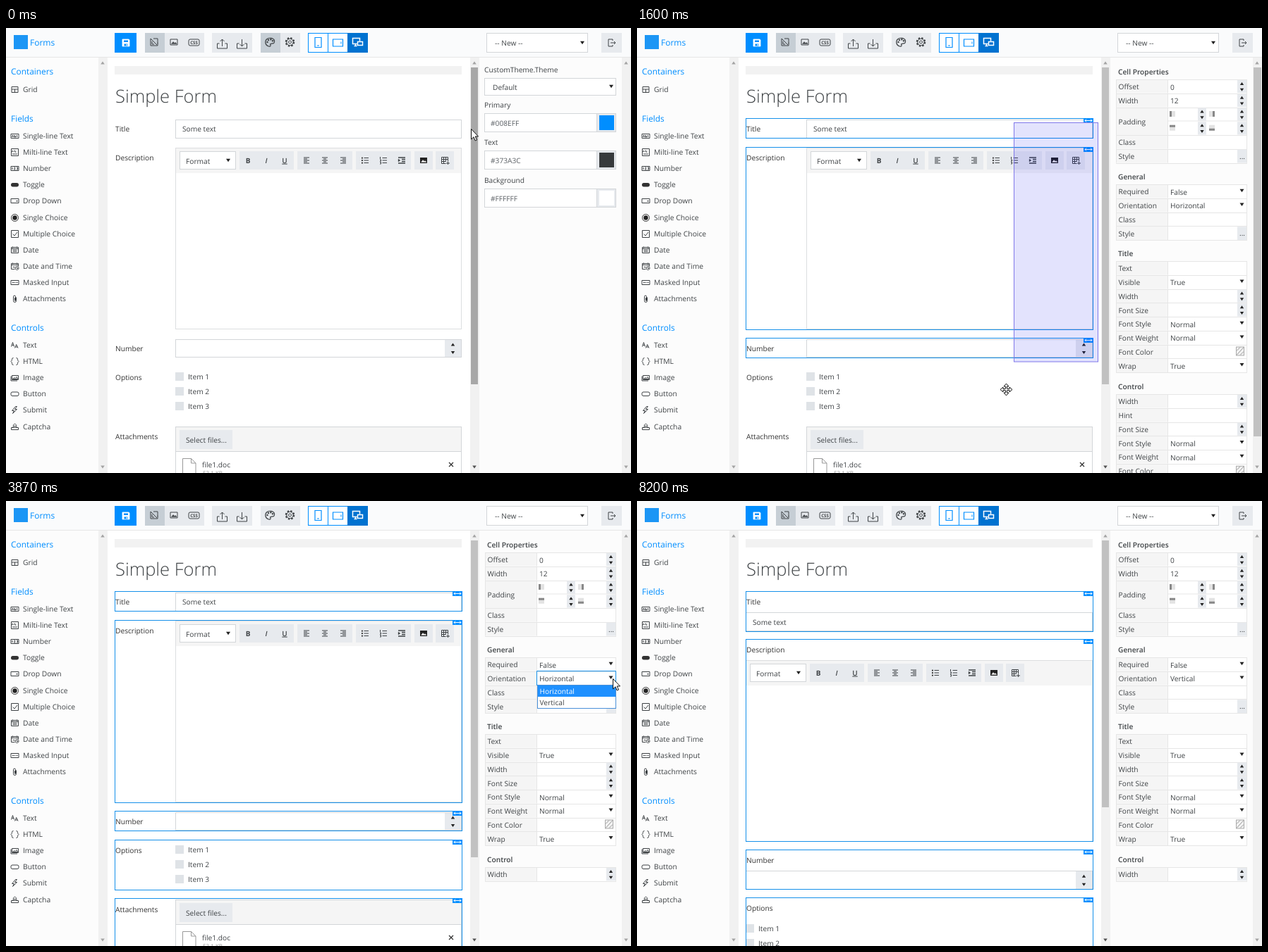
These frames come from a looping animation (886x632 px, 8.34 s). An HTML page:

```html
<!DOCTYPE html>
<html lang="en">
<head>
<meta charset="utf-8">
<title>Form designer</title>
<style>
html, body { margin: 0; width: 100%; height: 100%; overflow: hidden; background: #fff; }
svg { display: block; width: 886px; height: 632px; font: 10.2px "Open Sans", "Noto Sans", sans-serif; text-rendering: geometricPrecision; }
</style>
</head>
<body>
<svg id="stage" viewBox="0 0 886 632" xmlns="http://www.w3.org/2000/svg"></svg>
<script>
const BLUE = '#008eff', INK = '#3f4346', GREY = '#e7eaee', LINE = '#d3d6d9', SOFT = '#e6e6e6';

// ---- drawing helpers, all return markup ----
const rect = (x, y, w, h, fill, extra = '') =>
  `<rect x="${x}" y="${y}" width="${w}" height="${h}" fill="${fill}" ${extra}/>`;
const box = (x, y, w, h, fill, stroke) =>
  rect(x + .5, y + .5, w - 1, h - 1, fill, `stroke="${stroke}"`);
const text = (x, y, s, extra = '') => `<text x="${x}" y="${y}" fill="${INK}" ${extra}>${s}</text>`;
const path = (d, stroke = INK, fill = 'none', w = 1) =>
  `<path d="${d}" fill="${fill}" stroke="${stroke}" stroke-width="${w}"/>`;
const icon = (x, y, body) =>
  `<g transform="translate(${x} ${y})">${body[0] === '<' ? body : path(body)}</g>`;
const tri = (x, y, dir = 1, r = 3, fill = '#222') =>
  `<path d="M${x - r} ${y - dir * r * .75}h${2 * r}l${-r} ${dir * r * 1.5}z" fill="${fill}"/>`;
const spinner = (x, y, h, w = 13) =>
  rect(x, y, w, h, GREY) + tri(x + w / 2, y + h * .27, -1, 2.7) + tri(x + w / 2, y + h * .75, 1, 2.7);
const group = (id, body) => `<g id="${id}">${body}</g>`;

// ---- top bar ----
const IMAGE = path('M-5-4h10v8h-10z') + path('M-3.5 2.5l2.5-3 2 2 1.5-1 1.5 2z', INK, INK, .5);
const TRAY = 'M-4-1h-3v7h14v-7h-3';
function topBar() {
  const gear = '<circle r="5.6" fill="none" stroke="#3f4346" stroke-width="2.4" stroke-dasharray="2.4 2"/>' +
    '<circle r="4.7" fill="none" stroke="#3f4346"/><circle r="2" fill="none" stroke="#3f4346"/>';
  const palette = path('M6-2C5-6-2-7-5-4S-7 5-2 6c3 1 3-2 2-3 1-2 7 1 6-5z', INK, 'none', 1.2) +
    [[-4, 0], [-2.5, -3], [.8, -3.8], [3.6, -1.8]].map(([x, y]) => `<circle cx="${x}" cy="${y}" r="1.2" fill="${INK}"/>`).join('');
  return rect(0, 0, 886, 41, '#fafbfc') + rect(0, 41, 886, 1, SOFT) +
    rect(11, 10, 20, 20, '#1c96f5') + text(34, 25, 'Forms', `style="font-size:12px;fill:${BLUE}"`) +
    rect(154, 7, 31, 28, BLUE) +
    icon(170, 21, path('M-5-5h9l1 1v9h-10z', '#fff', '#fff', .8) + rect(-3, -3.5, 6, 2.5, BLUE) + rect(-2.5, 1.5, 5, 3, BLUE) + rect(.5, 2, 1.2, 2, '#fff')) +
    rect(197, 7, 84, 28, GREY) + rect(197, 7, 28, 28, '#c6ced5') +
    icon(210, 20, 'M-5-5v10h10v-4M-5-5l9 9M-1-5h6v7M-3-1v4h3') +
    icon(238, 20, IMAGE) +
    icon(266.5, 20.5, '<rect x="-7.5" y="-4.5" width="15" height="9" rx="2" fill="none" stroke="#3f4346"/>' +
      text(0, 2.4, 'CSS', 'text-anchor="middle" style="font-size:6.2px;font-weight:700"')) +
    rect(292, 7, 57, 28, GREY) +
    icon(306.5, 23, TRAY + 'M0 3v-10M-3-4l3-3 3 3') + icon(334.5, 23, TRAY + 'M0-7v10M-3 0l3 3 3-3') +
    rect(361, 7, 56, 28, GREY) + group('theme-on', rect(361, 7, 28, 28, '#c6ced5')) +
    icon(374.5, 20, palette) + icon(402.5, 20, gear) +
    box(428, 7, 29, 28, '#fff', BLUE) + box(456, 7, 30, 28, '#fff', BLUE) + rect(484, 7, 29, 28, '#0072d0') +
    icon(442.5, 20.5, path('M-4.5-7h9v14h-9z', BLUE, 'none', 1.2) + rect(-1.5, 4, 3, 1, BLUE)) +
    icon(470.5, 21, path('M-7-5h14v10h-14z', BLUE, 'none', 1.2) + rect(4, -1.5, 1, 3, BLUE)) +
    icon(498.5, 20.5, path('M-1 2h-6v-8h10v4M-5 5h4M-3 2v3M0-1h7v5H0z', '#fff', 'none', 1.5)) +
    box(681, 7, 144, 28, '#fff', LINE) + text(693, 25, '-- New --') + tri(817, 21) +
    rect(844, 7, 29, 28, GREY) + icon(859, 21, 'M1-3v-2h-6v10h6v-2M-2 0h7M3-2l2 2-2 2');
}

// ---- toolbox on the left ----
const FRAME = 'M-5.5-3h11v6h-11z';
const TOOLS = [
  ['Containers', 66, 91, [['Grid', 'M-4.5-4h9v8h-9zM-4.5-.5h9M0-.5v4.5']]],
  ['Fields', 133, 157, [
    ['Single-line Text', FRAME + 'M-4 1.5l1-3 1 3M-.5-1.5v3h1.5v-1.5h-1.5M3-1.5v3'],
    ['Milti-line Text', 'M-5-5h10v10h-10zM-4-.5l1-2 1 2M0-3v2.5h2M-3.5 2.5h7'],
    ['Number', FRAME + 'M-3.5-1.5v3M-1-1.5h1.5l-1.5 3h2M2.5-1.5h1.5v3h-1.5'],
    ['Toggle', '<rect x="-5.5" y="-2.5" width="11" height="5.5" rx="2.7" fill="#333"/>'],
    ['Drop Down', path(FRAME) + rect(2, -.5, 2, 1.5, INK)],
    ['Single Choice', '<circle r="5" fill="none" stroke="#333"/><circle r="3.2" fill="#222"/>'],
    ['Multiple Choice', 'M-5-5h10v10h-10zM-3 0l2.5 2.5 4-5'],
    ['Date', 'M-5-4h10v8h-10zM-5-2h10M-3-5v2M3-5v2M-3 0h6M-3 2h6'],
    ['Date and Time', 'M0 4h-5v-8h10v4M-5-2h10M-3-5v2M3-5v2M-3 1h3M3 0a2.5 2.5 0 1 0 .1 0M3 1v2h1.5'],
    ['Masked Input', FRAME + 'M-3.5 0h2M-.8 0h1.6M2 0h2'],
    ['Attachments', 'M2-2v5a2 2 0 0 1-4 0v-6a1.5 1.5 0 0 1 3 0v5.500a.5.500 0 0 1-1 0v-4']]],
  ['Controls', 430, 454, [
    ['Text', 'M-5 2l2-6 2 6M-4 0h2.500M0 4l2.200-5 2.300 5M1 2.500h2.500'],
    ['HTML', 'M-2-5q-2 0-2 2t-1.500 3q1.500 1 1.500 3t2 2M2-5q2 0 2 2t1.500 3q-1.500 1-1.500 3t-2 2'],
    ['Image', 'M-4-3h9v6h-9zM-5.500-2v6.500h9M-3 2l2-2 1.500 1 2-2 1.500 3z'],
    ['Button', '<rect x="-5.500" y="-2.500" width="11" height="5.500" rx="2" fill="none" stroke="#3f4346"/>'],
    ['Submit', 'M1-5l-5 6h3l-2 4 6-6h-3l3-4z'],
    ['Captcha', 'M-2-1a2.200 2.200 0 1 1 4 0M-5 4v-3h10v3zM-3 1l1-2h4l1 2']]]
];
function toolbox() {
  let out = rect(0, 42, 131, 590, '#fcfcfc') + scrollBar(131, '#a3a3a3', '#a3a3a3');
  for (const [head, y, top, items] of TOOLS) {
    out += text(7, y, head, `style="font-size:11.9px;fill:${BLUE}"`);
    items.forEach(([label, shape], i) => {
      const by = Math.round(top + i * 23.1);
      out += icon(12.5, by - 3.5, shape) + text(24, by, label, 'style="font-size:10.3px"');
    });
  }
  return out;
}
function scrollBar(x, up, down) {
  return rect(x, 42, 13, 590, '#f1f1f1') + tri(x + 6, 49.5, -1, 2.8, up) + tri(x + 6, 623.5, 1, 2.8, down);
}

// ---- the form in the middle ----
function editor(x, y, w, h) {
  const lines = (...ends) => ends.map(([a, b], i) => `M${a} ${i * 2 - 4}H${b}`).join('');
  const list = 'M-1.500-3.500h6.500M-1.500 0h6.500M-1.500 3.500h6.500';
  const glyph = (s, css) => text(0, 3.6, s, `text-anchor="middle" style="font-size:10px;${css}"`);
  const dots = [-3.5, 0, 3.5].map(d => rect(-5, d - .8, 1.8, 1.8, '#222')).join('');
  const icons = [
    [103, glyph('B', 'font-weight:700')], [129, glyph('I', 'font-style:italic;font-weight:600')],
    [155, glyph('U', 'text-decoration:underline;font-weight:600')],
    [186, lines([-4, 4], [-4, 1], [-4, 4], [-4, 1], [-4, 4])],
    [212, lines([-4, 4], [-2, 2], [-4, 4], [-2, 2], [-4, 4])],
    [238, lines([-4, 4], [-1, 4], [-4, 4], [-1, 4], [-4, 4])],
    [269, path(list) + dots], [295, list + 'M-4.500-5v3M-5-1h1.500v2h-1.500M-5 2.500h1.500v2.500h-1.500'],
    [321, path('M-5-4h10M0-1.500h5M0 1.500h5M-5 4h10', INK, 'none', 1.3) + path('M-5-2l3 2-3 2z', INK, INK, .3)],
    [352, rect(-5, -4, 10, 8, '#222') + path('M-3.500 2.500l2.500-3 2 2 1-1 2 2z', '#fff', '#fff', .3)],
    [382, 'M-4.500-4.500h9v6M-4.500-4.500v9h6M-4.500-1.500h9M-4.500 1.500h6M-1.500-4.500v9M1.500-4.500v6M2 4h5M4.500 2v4']
  ];
  return box(x, y, w, h, '#fff', '#dcdee0') + rect(x + 1, y + 1, w - 2, 35, '#f5f5f5') +
    box(x + 6, y + 5, 80, 26, '#fff', LINE) + text(x + 15, y + 23, 'Format') + tri(x + 75, y + 18) +
    [[91, 77], [173, 78], [256, 78], [339, 26], [369, 26]].map(([dx, gw]) => rect(x + dx, y + 5, gw, 26, GREY)).join('') +
    icons.map(([dx, body]) => icon(x + dx, y + 18, body)).join('');
}
const field = (x, y, w, h) => box(x, y, w, h, '#fff', LINE);
const numeric = (x, y, w, h) => field(x, y, w, h) + spinner(x + w - 24, y + 1, h - 2, 23);
const check = (x, y, n) => rect(x, y - 10, 12, 12, '#dfe3e7') + text(x + 18, y, 'Item ' + n);
const label = (y, s) => text(155, y, s, 'style="fill:#333"');
const outline = (y, h) => box(154, y, 493, h, 'none', '#1590ea') + rect(633, y, 14, 7, BLUE) +
  icon(640, y + 3.5, path('M-5 0h10M-3-2l-2 2 2 2M3-2l2 2-2 2', '#fff'));

const ROWS = [[128, 29], [169, 260], [440, 29], [481, 72], [564, 90]];
const TALL_ROWS = [[128, 58], [196, 288], [495, 57], [563, 90]];

const wideForm = () =>
  label(147, 'Title') + field(240, 130, 406, 27) + text(250, 147, 'Some text') +
  label(188, 'Description') + editor(240, 170, 406, 258) +
  label(459, 'Number') + numeric(240, 442, 406, 26) +
  label(500, 'Options') + check(240, 499, 1) + check(240, 520, 2) + check(240, 541, 3) +
  label(584, 'Attachments') + box(240, 566, 406, 80, '#fff', LINE) + rect(241, 567, 404, 34, '#f5f5f5') +
  rect(241, 601, 404, 1, LINE) + rect(246, 571, 75, 27, GREY) + text(255, 589, 'Select files...') +
  path('M250.500 632v-20.500h12l6.500 6.500v14M262.500 611.500v6.500h6.500', '#999') + text(278, 623.5, 'file1.doc') +
  text(279, 635, '53.1 KB', 'style="font-size:8px;fill:#999"') +
  path('M628 617l6 6M634 617l-6 6', '#333', 'none', 1.3);

const tallForm = () =>
  label(147, 'Title') + field(154, 158, 492, 27) + text(164, 176, 'Some text') +
  label(215, 'Description') + editor(154, 226, 492, 258) +
  label(514, 'Number') + numeric(154, 525, 492, 27) +
  label(582, 'Options') + check(154, 611, 1) + check(154, 632, 2) +
  TALL_ROWS.map(r => outline(...r)).join('');

// ---- right panel ----
function themePanel() {
  const color = (y, name, value, fill) => text(678, y - 8, name) + field(678, y, 160, 27) +
    text(687, y + 18, value, 'style="fill:#5a5f64"') + box(837, y, 28, 27, GREY, LINE) + rect(841, y + 3, 21, 21, fill);
  return text(678, 63, 'CustomTheme.Theme') + field(678, 71, 187, 25) + text(690, 88, 'Default') + tri(858, 83) +
    color(121, 'Primary', '#008EFF', BLUE) + color(174, 'Text', '#373A3C', '#373a3c') + color(228, 'Background', '#FFFFFF', '#fff');
}

const PITCH = 19.75;
function section(top, head, rows) {
  let y = top, out = text(682, top - 7.5, head, 'style="font-weight:600"');
  for (const [name, kind, value = ''] of rows) {
    const h = kind === 'pad' ? PITCH * 2 : PITCH;
    out += rect(679, y, 186, h, '#fff') + rect(679, y, 74, h, '#f5f5f5') +
      text(682.5, y + h / 2 + 4.5, name) + text(756, y + 14.5, value, name === 'Orientation' ? 'id="orient"' : '') +
      path(`M679 ${Math.round(y) + .5}H865M752.500 ${y}v${h}`, SOFT);
    if (kind === 'spin') out += spinner(851, y + 1, h - 1.5);
    if (kind === 'list') out += tri(857.5, y + 9);
    if (kind === 'more') out += rect(851, y + 1, 14, h - 1, GREY) + text(858, y + 14, '...', 'text-anchor="middle"');
    if (kind === 'color') out += box(849, y + 3, 12, 13, '#f2f2f2', '#aaa') + path(`M850 ${y + 9}l5-5M850 ${y + 15}l10-11M855 ${y + 15}l5-5`, '#999');
    if (kind === 'pad') {
      [0, PITCH].forEach((d, i) => {
        out += spinner(795, y + d + 1, PITCH - 1.5, 12) + spinner(851, y + d + 1, PITCH - 1.5);
        [755, 811].forEach((x, j) => out += rect(x, y + d + 5.5, 8, 8, '#e3e3e3') +
          (i ? rect(x, y + d + 5.5 + j * 5, 8, 3, '#888') : rect(x + j * 5, y + 5.5, 3, 8, '#888')));
      });
      out += path(`M753 ${y + PITCH - .25}H865`, SOFT);
    }
    y += h;
  }
  return out + path(`M679 ${Math.round(y) + .5}H865M864.500 ${top}V${y}M679.500 ${top}V${y}`, SOFT);
}
const FONT = [['Font Size', 'spin'], ['Font Style', 'list', 'Normal'], ['Font Weight', 'list', 'Normal'], ['Font Color', 'color']];
const cellPanel = () =>
  section(73, 'Cell Properties', [['Offset', 'spin', '0'], ['Width', 'spin', '12'], ['Padding', 'pad'], ['Class'], ['Style', 'more']]) +
  section(222, 'General', [['Required', 'list', 'False'], ['Orientation', 'list', 'Horizontal'], ['Class'], ['Style', 'more']]) +
  section(331, 'Title', [['Text'], ['Visible', 'list', 'True'], ['Width', 'spin'], ...FONT, ['Wrap', 'list', 'True']]) +
  group('control-short', section(520, 'Control', [['Width', 'spin']])) +
  group('control-full', section(520, 'Control', [['Width', 'spin'], ['Hint'], ...FONT]) + rect(874, 56, 11, 524, '#c1c1c1'));

const dropDown = () => box(753, 261, 112, 34, '#fff', '#4a90d9') +
  `<rect id="option" x="754" width="110" height="16" fill="#1e90ff"/>` +
  text(756.5, 274, 'Horizontal', 'id="opt0"') + text(756.5, 290, 'Vertical', 'id="opt1"');

// ---- pointers ----
const arm = [0, 90, 180, 270].map(a => `<path transform="rotate(${a})" d="M-1-1V-4.500H-3.500L0-8.500 3.500-4.500H1V-1" fill="#fff" stroke="#111"/>`).join('');
const pointers = () =>
  group('arrow', path('M0 0V14.500L3.400 11.300 5.700 16.500 8 15.500 5.700 10.500H10z', '#111', '#fff')) +
  group('move', arm + rect(-1, -1, 2, 2, '#fff')) +
  group('beam', path('M-3-6.500h2.500l.500.500.500-.500h2.500M0-6v12M-3 6.500h2.500l.500-.500.500.500h2.500', '#111', 'none', 1.2));

document.getElementById('stage').innerHTML =
  rect(0, 0, 886, 632, '#fff') + topBar() + toolbox() +
  rect(154, 54, 492, 12, '#f2f2f2') + text(155, 106, 'Simple Form', 'style="font-size:25.500px;font-weight:300"') +
  group('wide', wideForm() + ROWS.map((r, i) => group('row' + i, outline(...r))).join('')) +
  group('tall', tallForm()) +
  scrollBar(658, '#a3a3a3', '#505050') + '<rect id="thumb" x="659" y="56" width="10"/>' +
  rect(671, 42, 202, 590, '#fcfcfc') + scrollBar(873, '#a3a3a3', '#a3a3a3') +
  group('theme', themePanel()) +
  group('cell', cellPanel() + group('focus', path('M752.500 262V241.500H864.500V262', '#1590ea')) + group('drop', dropDown())) +
  '<rect id="lasso" fill="#0000e6" fill-opacity=".11" stroke="#8078ea"/>' + pointers();

// ---- timeline, in ticks of 1/15 s ----
const LOOP = 8340, TICK = 1000 / 15;
const PATH = [
  [0, 659, 143], [13, 654, 134, 1], [14, 653, 137], [15, 646, 149], [16, 621, 180], [23, 534, 476], [24, 523, 513],
  [25, 500, 568], [26, 450, 605], [27, 350, 622], [28, 265, 621], [29, 370, 618], [30, 460, 616], [37, 460, 616],
  [50, 846, 258, 1], [54, 860, 252, 1], [61, 860, 252], [67, 848, 283, 1], [80, 848, 284], [92, 793, 597, 1]
];
function pointAt(k) {
  const i = PATH.findIndex(p => p[0] >= k);
  if (i < 0) return PATH[PATH.length - 1].slice(1, 3);
  if (i === 0) return PATH[0].slice(1, 3);
  const [a, x, y] = PATH[i - 1], [b, x2, y2, ease] = PATH[i];
  let u = (k - a) / (b - a);
  if (ease) u = u * u * (3 - 2 * u);
  return [x + (x2 - x) * u, y + (y2 - y) * u];
}

const el = id => document.getElementById(id);
const show = (id, on) => el(id).setAttribute('display', on ? 'inline' : 'none');
const set = (id, attrs) => { for (const n in attrs) el(id).setAttribute(n, attrs[n]); };

function draw(t) {
  const k = Math.floor(t / TICK + .06);
  const [x, y] = pointAt(k);
  const tall = k >= 75;

  // the lasso follows the pointer one tick late
  const [lx, ly] = pointAt(k - 1);
  const lasso = k >= 15 && k < 35;
  show('lasso', lasso);
  if (lasso) set('lasso', { x: Math.round(lx) + .5, y: 134.5, width: 653 - Math.round(lx), height: Math.max(1, Math.round(ly) - 137 + .5) });

  const reach = k < 17 ? 0 : pointAt(Math.min(k - 1, 27))[1] - 2;
  const picked = ROWS.filter(r => r[0] <= reach).length;
  ROWS.forEach((r, i) => show('row' + i, i < picked));
  show('wide', !tall);
  show('tall', tall);
  set('thumb', { height: tall ? 379 : 450, fill: k < 13 && x > 656 ? '#a8a8a8' : '#c1c1c1' });

  show('theme-on', !picked);
  show('theme', !picked);
  show('cell', picked > 0);
  show('control-full', picked > 0 && picked < 5);
  show('control-short', picked === 5);
  el('orient').textContent = tall ? 'Vertical' : 'Horizontal';
  show('focus', k >= 57 && k < 123);
  show('drop', k >= 58 && !tall);
  const second = k >= 62 && y > 278;
  set('option', { y: second ? 278 : 262 });
  el('opt0').style.fill = second ? INK : '#fff';
  el('opt1').style.fill = second ? '#fff' : INK;

  const kind = k >= 93 ? '' : tall && y < 300 ? 'beam' : k >= 14 && x < 653.5 ? 'move' : 'arrow';
  for (const id of ['arrow', 'move', 'beam']) show(id, id === kind);
  if (kind) set(kind, { transform: `translate(${Math.round(x) + .5} ${Math.round(y) + .5})` });
}

const start = performance.now();
function loop() {
  draw((performance.now() - start) % LOOP);
  requestAnimationFrame(loop);
}
loop();
</script>
</body>
</html>
```
